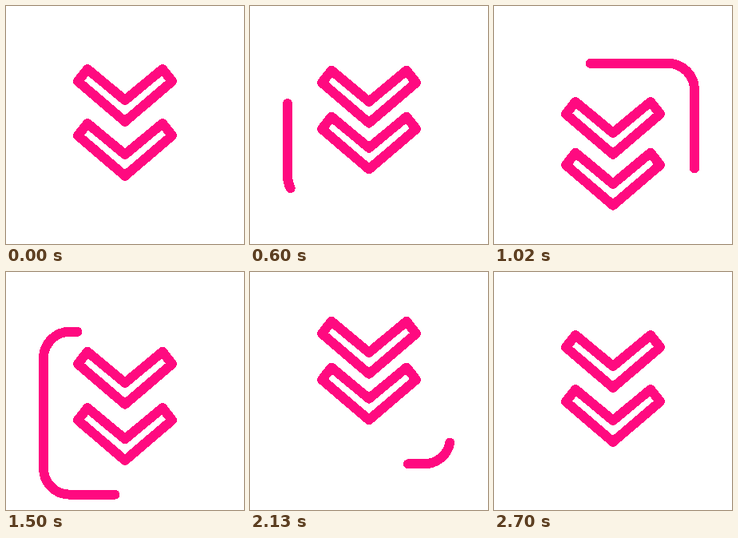
Write an HTML page that moves like this. It is 298 px wide and 298 px high and loops after 4.08 s.

```html
<!DOCTYPE html>
<html lang="en">
<head>
<meta charset="utf-8">
<title>Scroll down</title>
<style>
  html, body { margin: 0; width: 100%; height: 100%; overflow: hidden; background: #fff; }
  svg { display: block; width: 100%; height: 100%; shape-rendering: crispEdges; }
  path { fill: none; stroke: #ff0a80; stroke-width: 12; stroke-linecap: round; stroke-linejoin: round; }
</style>
</head>
<body>
<svg viewBox="0 0 298 298">
  <path id="trail"/>
  <path id="upper"/>
  <path id="lower"/>
</svg>
<script>
const LOOP = 4080, STEP = 30, SETTLED = 2700, GAP = 68;
const [trail, upper, lower] = ["trail", "upper", "lower"].map(id => document.getElementById(id));

const chevron = "l47 39l47 -39l12 15.3l-59 50.4l-59 -50.4z";
upper.setAttribute("d", "M102 79" + chevron);
lower.setAttribute("d", `M102 ${79 + GAP}` + chevron);

// Two clockwise rounds of the rounded square, from the bottom centre.
const round = "H80a33 33 0 0 1 -33 -33V80a33 33 0 0 1 33 -33H218" +
  "a33 33 0 0 1 33 33V218a33 33 0 0 1 -33 33H149";
trail.setAttribute("d", "M149 251" + round + round);
const pathLength = trail.getTotalLength();

// Cubic Bezier easing with handles (p1, 0) and (p2, 1).
function ease(x, p1 = 1 / 3, p2 = 2 / 3) {
  if (x <= 0) return 0;
  if (x >= 1) return 1;
  let lo = 0, hi = 1;
  for (let i = 0; i < 24; i++) {
    const v = (lo + hi) / 2, w = 1 - v;
    if (3 * v * w * w * p1 + 3 * v * v * w * p2 + v * v * v < x) lo = v;
    else hi = v;
  }
  return lo * lo * (3 - 2 * lo);
}

const progress = (t, from, to) => (t - from) / (to - from);

// Lift from rest, sink to the lowest point, lift again, settle.
function sway(t, { lift, sink, lifted, up, down, handles = [] }) {
  return -up * ease(progress(t, 0, lift))
    + (up + down) * ease(progress(t, lift, sink))
    - (up + down) * ease(progress(t, sink, lifted), ...handles)
    + up * ease(progress(t, lifted, SETTLED));
}

const upperSway = { lift: 330, sink: 1000, lifted: 2300, up: 20, down: 41 };
const lowerSway = { lift: 270, sink: 1130, lifted: 2310, up: 32, down: 40 };
const trailSway = { lift: 340, sink: 1200, lifted: 2250, up: 15, down: 30, handles: [0.81, 0.76] };

const shift = (el, y) => el.setAttribute("transform", `translate(0 ${y.toFixed(2)})`);

function draw(ms) {
  const t = Math.floor(ms % LOOP / STEP) * STEP;
  shift(upper, sway(t, upperSway));
  shift(lower, sway(t, lowerSway));
  shift(trail, sway(t, trailSway));

  const head = pathLength * ease(progress(t, 60, 2450), 0.343, 0.567);
  const tail = pathLength * ease(progress(t, 120, 2350), 0.461, 0.841);
  const length = head - tail;
  trail.setAttribute("visibility", length > 0.5 ? "visible" : "hidden");
  trail.setAttribute("stroke-dasharray", `${Math.max(length, 0.5)} ${2 * pathLength}`);
  trail.setAttribute("stroke-dashoffset", -tail);
}

const begin = performance.now();
function tick() {
  draw(performance.now() - begin);
  requestAnimationFrame(tick);
}
tick();
</script>
</body>
</html>
```
